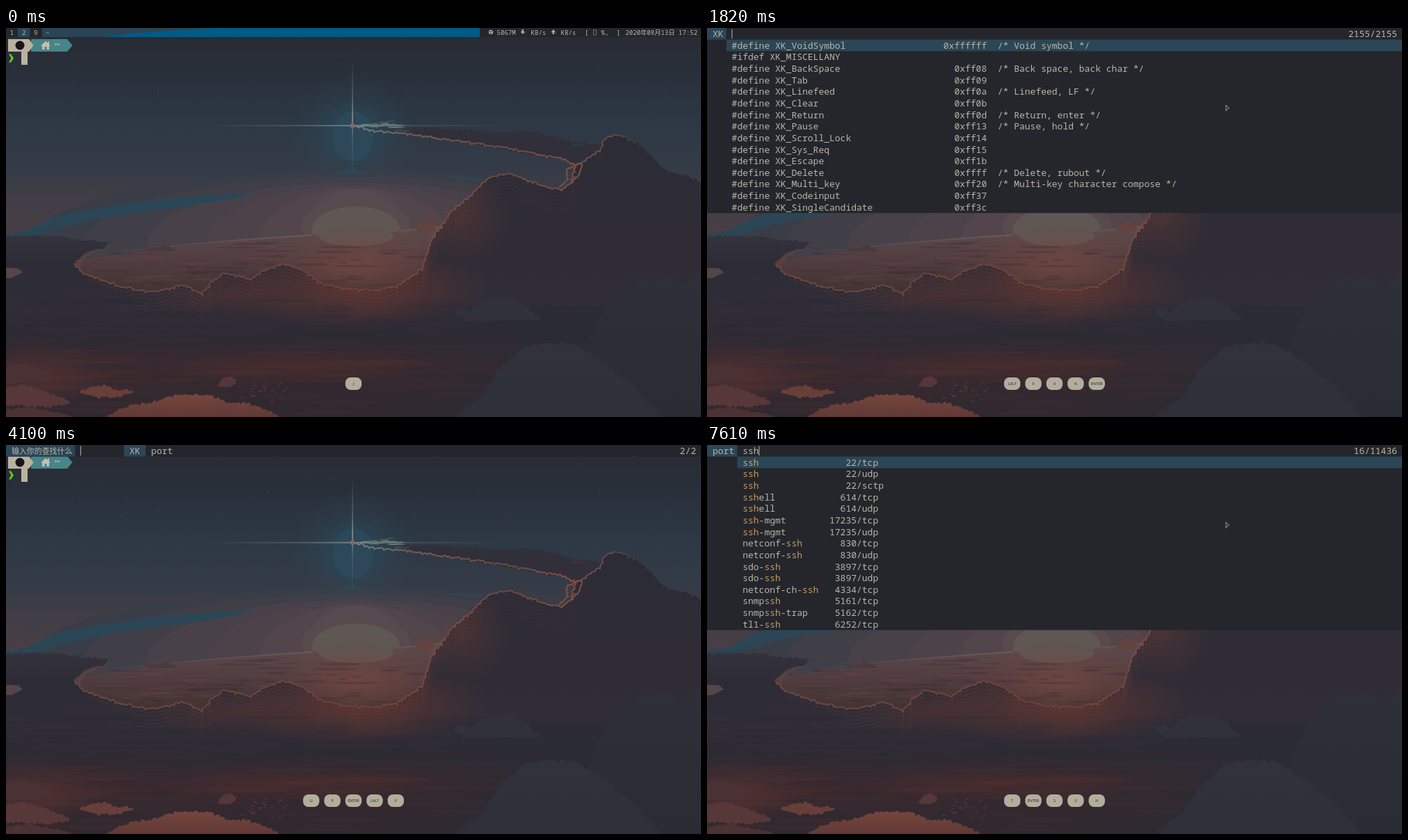
An HTML page with a canvas that plays this animation: 999 by 560 pixels, repeating every 8 s.

```html
<!DOCTYPE html>
<html lang="en">
<head>
<meta charset="utf-8">
<title>Menu lookup</title>
<style>
html, body { margin: 0; width: 999px; height: 560px; overflow: hidden; background: #2a2b34; }
canvas, svg { position: absolute; left: 0; top: 0; }
text { white-space: pre; fill: #bab6a8; font-family: "Noto Sans Mono", "Noto Sans CJK SC", "Noto Sans CJK JP", "Noto Sans CJK", monospace; font-size: 13px; }
#bar text { font-size: 9.1px; }
#keys text { font: 5.4px "Noto Sans", sans-serif; fill: #222; text-anchor: middle; }
#keys rect { fill: #b3ad9c; }
.hit { fill: #c79c5c; }
.sel .hit { fill: #c4ad56; }
.cjk { font-size: 10.93px; }
.end { text-anchor: end; }
</style>
</head>
<body>
<canvas id="sky" width="999" height="560"></canvas>
<svg width="999" height="560" xml:space="preserve">
  <g id="shell">
    <path d="M36 16H88L95.500 25L88 34H36Z" fill="#46858a"/>
    <path d="M3 16H33L39.500 25L33 34H3Z" fill="#bab29f"/>
    <circle cx="20" cy="25" r="6.500" fill="#15161a"/>
    <path d="M50 25.500L57 19L60 21.500V19.500H62V23.500L64 25.500H62V31H58.500V27H55.500V31H52V25.500Z" fill="#c6c0ae"/>
    <text x="69" y="29" style="font-size:15px;font-weight:700;fill:#c6c0ae">~</text>
    <path d="M4 37.500H7L11 43.500L7 49.500H4L7.500 43.500Z" fill="#5fd311"/>
    <rect x="22" y="34" width="9" height="19" fill="#bab29f"/>
  </g>
  <g id="bar">
    <rect width="999" height="13" fill="#24262c"/>
    <rect x="17" width="17.500" height="13" fill="#2b4656"/>
    <rect x="52" width="629" height="13" fill="#294555"/>
    <path d="M140 13L190 7L300 0H681V13Z" fill="#005b86"/>
    <text x="5.500" y="9.500">1</text><text x="23" y="9.500">2</text>
    <text x="40" y="9.500">9</text><text x="57" y="9.500">~</text>
    <circle cx="697" cy="6" r="3.200" fill="#aaa698"/>
    <path d="M695 4.500L697 6L699 4M695.500 8H698" stroke="#24262c" fill="none"/>
    <path d="M741.500 2H744V5H746L742.700 9L739.500 5H741.500Z" fill="#aaa698"/>
    <path d="M785.500 9H788V6H790L786.700 2L783.500 6H785.500Z" fill="#aaa698"/>
    <path d="M746 5V9M790 5V9" stroke="#595950"/>
    <text x="705.500" y="9.500">5067M</text><text x="754.500" y="9.500">KB/s</text>
    <text x="797.500" y="9.500">KB/s</text><text x="832" y="9.500">[</text>
    <rect x="844.500" y="3" width="4" height="7" fill="none" stroke="#aaa698" stroke-width=".6"/>
    <text x="855.500" y="9.500">%,</text><text x="877.500" y="9.500">]</text>
    <text x="994" y="9.500" class="end">2020年08月13日 17:52</text>
  </g>
  <g id="menu"></g>
  <path id="pointer" d="M746 111L750.500 115.500L748 116.500L746 119.500Z" fill="#222329" stroke="#aaa5ba" stroke-width=".9"/>
  <g id="keys"></g>
</svg>
<script>
const $ = id => document.getElementById(id);

// ---------- wallpaper ----------
const c = $('sky').getContext('2d');
let seed = 11;
const rnd = () => (seed = (seed * 16807) % 2147483647) / 2147483647;

function linear(x0, y0, x1, y1, stops) {
  const g = c.createLinearGradient(x0, y0, x1, y1);
  stops.forEach(([at, color]) => g.addColorStop(at, color));
  return g;
}
function oval(x, y, rx, ry, fill) {
  c.fillStyle = fill;
  c.beginPath();
  c.ellipse(x, y, rx, ry, 0, 0, 7);
  c.fill();
}
function glow(x, y, rx, ry, rgb, alpha) {
  c.save();
  c.translate(x, y);
  c.scale(rx, ry);
  const g = c.createRadialGradient(0, 0, 0, 0, 0, 1);
  g.addColorStop(0, `rgba(${rgb},${alpha})`);
  g.addColorStop(1, `rgba(${rgb},0)`);
  c.fillStyle = g;
  c.fillRect(-1, -1, 2, 2);
  c.restore();
}
// Bumpy cloud outline through a few points
function puff(points, step = 8, bump = .7) {
  const p = points.split(' ').map(s => s.split(',').map(Number));
  let d = 'M' + p[0];
  for (let i = 1; i < p.length; i++) {
    const [x0, y0] = p[i - 1], [x1, y1] = p[i];
    const dx = x1 - x0, dy = y1 - y0, len = Math.hypot(dx, dy);
    const n = Math.max(1, Math.round(len / step));
    for (let k = 1; k <= n; k++) {
      const m = (k - .5) / n, h = bump * step * (rnd() + .15) / len, j = k < n ? (rnd() - .5) * 3 : 0;
      d += `Q${x0 + dx * m + dy * h} ${y0 + dy * m - dx * h} ${x0 + dx * k / n} ${y0 + dy * k / n + j}`;
    }
  }
  return d;
}
function fill(d, style) { c.fillStyle = style; c.fill(new Path2D(d)); }
function stroke(d, style, width, dy = 0) {
  c.save();
  c.translate(0, dy);
  c.strokeStyle = style;
  c.lineWidth = width;
  c.stroke(new Path2D(d));
  c.restore();
}

function drawSky() {
  c.fillStyle = linear(0, 0, 0, 400, [[0, '#272a32'], [.2, '#2a313c'], [.36, '#2d3945'],
    [.5, '#343b46'], [.6, '#3f3d46'], [.78, '#4b3f44'], [1, '#3d3037']]);
  c.fillRect(0, 0, 999, 560);
  for (let i = 0; i < 45; i++) oval(rnd() * 999, 15 + rnd() * 110, .5, .5, 'rgba(150,160,165,.4)');

  // nested bands of dusk light
  [[470, 104, '#393d47'], [390, 96, '#403f48'], [300, 87, '#484149'], [215, 83, '#4d424a'], [140, 80, '#52454b']]
    .forEach(([rx, ry, color]) => oval(503, 310, rx, ry, color));
  fill('M18 299C55 276 80 267 112 264C190 250 240 243 362 237Q320 249 260 256C170 268 110 276 62 292Q35 301 0 302Z', '#2b4757');
  fill('M0 296Q50 291 90 270L60 295L0 304Z', '#2b4555');
  fill('M628 213Q665 214 692 219Q670 222 628 213Z', '#2c4656');
  fill('M468 209Q490 206 497 199Q505 207 526 209Z', '#2c4554');

  // bright star and its rays
  glow(499, 150, 90, 85, '42,80,96', .5);
  oval(499, 152, 47, 43, 'rgba(42,70,86,.35)');
  oval(499, 156, 30, 36, '#2c4859');
  const ray = (x0, y0, x1, y1) => linear(x0, y0, x1, y1,
    [[0, 'rgba(130,137,137,0)'], [.3, 'rgba(120,126,126,.55)'], [.5, '#94938e'], [.7, 'rgba(120,126,126,.35)'], [1, 'rgba(130,137,137,0)']]);
  c.fillStyle = ray(0, 48, 0, 212); c.fillRect(497.300, 48, 1.600, 164);
  c.fillStyle = ray(290, 0, 720, 0); c.fillRect(290, 139.800, 430, 1.500);

  // sun, horizon and low haze
  oval(503, 284, 69, 53, '#574950');
  oval(503, 285, 78, 36, '#594a4e');
  oval(503, 290, 63, 33, '#5f5753');
  fill('M95 335Q250 312 440 297L503 303L566 292L650 283V400H95Z',
    linear(0, 290, 0, 390, [[0, '#5d4a4b'], [.4, '#523e41'], [1, '#40302f']]));
  stroke('M110 329Q260 309 440 298', linear(100, 0, 440, 0, [[0, 'rgba(104,87,83,0)'], [1, '#6b5b57']]), 2);
  stroke('M566 292Q600 288 640 284', 'rgba(113,88,82,.7)', 2);
  oval(503, 299, 54, 15, '#5f5552');
  glow(505, 340, 130, 55, '118,72,64', .75);
  for (let i = 0; i < 90; i++) {
    const y = 308 + rnd() * 66, x = 150 + rnd() * 450;
    oval(x, y, 6 + rnd() * 28, .6 + rnd() * 1.500, rnd() < .5 ? 'rgba(112,77,71,.2)' : 'rgba(50,38,44,.25)');
  }
  fill(puff('203,322 215,316 228,314 245,321') + 'Z', '#493a40');
}

function drawTrail() {
  fill(puff('560,149 600,145 680,150 760,151 822,166 868,170 840,205 800,188 720,175 620,157') + 'Z', '#302f3a');
  const edge = puff('500,141 530,150 570,152 620,160 675,167 730,176 770,184 800,190 818,198', 7);
  stroke(edge, linear(500, 0, 820, 0, [[0, '#76817e'], [.25, '#735b52'], [.7, '#70493f'], [1, '#835044']]), 2);
  for (let i = 0; i < 26; i++) {
    const x = 505 + rnd() * 55, s = (x - 498) / 8;
    const y = 140 + (rnd() * 2 - 1) * s;
    stroke(`M${x} ${y}q8 ${rnd() * 4 - 2} ${8 + rnd() * 16} ${rnd() * 4 - 2}`, 'rgba(128,142,138,.65)', .8);
  }
  oval(498, 140.500, 3.500, 3.500, '#83685f');
}

function drawClouds() {
  // distant ridge on the left and the tower on the right share one outline
  const ridge = puff('95,338 112,355 135,363 165,373 200,381 235,377 255,371 282,384 298,365 315,354 352,363 378,347 402,342 428,350 448,367 482,376 530,379 562,374 580,361 598,349 606,325 612,305 627,288 640,265 664,247 682,228 697,215 724,210 750,222 778,230 799,234 815,222 819,200 840,186 854,178 862,160 880,155 910,168 930,188 950,208 980,214 1000,224');
  fill(ridge + 'V560H0V350Z', linear(0, 150, 0, 560, [[0, '#2b2c36'], [.45, '#302c35'],
    [.58, '#302d36'], [.7, '#2e2b34'], [.82, '#38292e'], [1, '#302930']]));
  c.save();
  c.clip(new Path2D(ridge + 'V560H0V350Z'));
  glow(510, 376, 190, 62, '105,54,48', .75);
  glow(655, 270, 70, 70, '96,56,52', .5);
  glow(330, 385, 130, 35, '86,50,49', .5);
  for (let i = 1; i < 7; i++)
    stroke(ridge, linear(80, 0, 900, 0, [[0, 'rgba(105,64,58,.2)'], [.6, `rgba(115,66,56,${.42 - i * .055})`],
      [.85, 'rgba(92,60,59,.12)'], [1, 'rgba(60,50,58,0)']]), 1.300, i * 5.500);
  c.restore();
  stroke(ridge, linear(95, 0, 960, 0, [[0, '#6e4942'], [.25, '#70463f'], [.5, '#6e423b'], [.62, '#824d42'],
    [.72, '#75483f'], [.84, '#805145'], [.9, '#6d4b46'], [.95, 'rgba(70,54,58,.4)'], [1, 'rgba(60,50,58,0)']]), 1.800);
  stroke(puff('796,230 808,218 806,205 818,198 828,196 822,212 812,222', 5), '#80513f', 1.800);
  fill(puff('590,292 594,283 606,278 617,284 613,292 600,296', 5) + 'Z', '#63433f');
  for (let i = 0; i < 9; i++) oval(614 + rnd() * 24, 264 + rnd() * 22, 1.500, 1, '#69463f');
  for (let i = 0; i < 7; i++) oval(814 + i * 2.500, 169 + rnd() * 5 - 3, 1.500, .8, '#4c4143');

  // left anvil cloud
  fill(puff('0,302 30,300 75,301 108,307 147,309') + 'L140 318L112 325L96 341L120 366L175 385L190 400H0Z',
    linear(0, 300, 0, 400, [[0, '#33323d'], [.4, '#2d2c36'], [1, '#302d37']]));
  fill('M0 345L18 346L24 352L8 360H0Z', '#554448');
  fill(puff('0,373 10,363 30,355 50,362 80,368') + 'V390H0Z', '#2e2d37');
  for (let i = 0; i < 5; i++)
    stroke(puff(`${142 - i * 6},${316 + i * 2} ${116 - i * 3},${323 + i * 4} ${98 + i * 2},${338 + i * 3}`, 6), `rgba(116,72,63,${.55 - i * .07})`, 1.300);
}

function drawFront() {
  // streaky cloud floor
  for (let i = 0; i < 150; i++) {
    const y = 392 + rnd() * 165, x = rnd() * 780;
    const warm = y > 455 && rnd() < .55;
    oval(x, y, 20 + rnd() * 75, 1 + rnd() * 4, warm ? 'rgba(92,48,46,.13)' : 'rgba(40,40,50,.2)');
  }
  glow(420, 488, 230, 24, '92,48,46', .4);
  glow(40, 500, 100, 45, '104,55,51', .5);
  c.fillStyle = linear(540, 0, 999, 0, [[0, 'rgba(42,43,52,0)'], [.5, 'rgba(42,43,52,.75)'], [1, 'rgba(41,43,50,.85)']]);
  c.fillRect(540, 400, 459, 160);

  fill(puff('655,422 668,408 690,393 720,389 745,400 768,420', 12) + 'Z', '#30313b');
  fill(puff('830,560 845,440 865,400 890,378 915,362 950,360 975,372 1000,355', 14) + 'V560Z',
    linear(0, 350, 0, 560, [[0, '#2e3039'], [1, '#2a2c34']]));
  fill(puff('650,560 690,525 712,492 742,462 780,455 820,458 855,480 905,520 940,560', 14) + 'Z',
    linear(0, 450, 0, 560, [[0, '#30333c'], [1, '#2d3038']]));
  fill(puff('645,412 648,404 658,402 664,410 655,417', 5) + 'Z', '#32323c');

  // red-lit tops along the bottom
  fill(puff('0,488 20,483 45,489 62,498 40,508 0,510') + 'Z', '#4a3134');
  fill(puff('0,519 22,514 48,522 72,530 92,540 60,545 0,542') + 'Z', '#573737');
  fill(puff('106,525 122,517 145,516 162,522 184,523 160,530 130,531') + 'Z', '#683e39');
  fill(puff('305,516 310,506 322,502 331,509 320,517', 6) + 'Z', '#55363a');
  const bank = puff('145,560 160,551 183,543 210,540 232,531 262,529 292,529 316,540 345,541 368,549 392,560');
  fill(bank + 'Z', linear(0, 528, 0, 560, [[0, '#75453e'], [1, '#603936']]));
  fill(puff('0,552 30,546 70,554 95,560') + 'H0Z', '#4c3234');
  for (let i = 0; i < 24; i++) oval(330 + rnd() * 75, 508 + rnd() * 30, 1 + rnd() * 2.500, 1, 'rgba(98,56,52,.7)');
}

drawSky();
drawTrail();
drawClouds();
drawFront();

// ---------- menus ----------
const ROW = 16.65, COL = 7.8, LOOP = 8000, BG = '#24262c', PICK = '#2b4656';

const symbols = `VoidSymbol ffffff Void symbol
!#ifdef XK_MISCELLANY
BackSpace ff08 Back space, back char
Tab ff09
Linefeed ff0a Linefeed, LF
Clear ff0b
Return ff0d Return, enter
Pause ff13 Pause, hold
Scroll_Lock ff14
Sys_Req ff15
Escape ff1b
Delete ffff Delete, rubout
Multi_key ff20 Multi-key character compose
Codeinput ff37
SingleCandidate ff3c
Up ff52 Move up, up arrow
Page_Up ff55
KP_Up ff97
KP_Page_Up ff9a
Super_L ffeb Left super
Super_R ffec Right super
ISO_Group_Shift ff7e Alias for mode_switch
ISO_Group_Latch fe06
ISO_Group_Lock fe07
ISO_Next_Group fe08
ISO_Next_Group_Lock fe09
ISO_Prev_Group fe0a
ISO_Prev_Group_Lock fe0b
ISO_First_Group fe0c
ISO_First_Group_Lock fe0d`.split('\n').map(line => {
  if (line[0] === '!') return line.slice(1);
  const [name, code, ...note] = line.split(' ');
  return ('#define XK_' + name).padEnd(45 - code.length) + '0x' + code + (note.length ? `  /* ${note.join(' ')} */` : '');
});

const services = `tcpmux 1 tcp udp
compressnet 2 tcp udp
compressnet 3 tcp udp
rje 5 tcp udp
echo 7 tcp udp
discard 9 tcp udp sctp dccp
systat 11 tcp udp
ssh 22 tcp udp sctp
sshell 614 tcp udp
ssh-mgmt 17235 tcp udp
netconf-ssh 830 tcp udp
sdo-ssh 3897 tcp udp
netconf-ch-ssh 4334 tcp
snmpssh 5161 tcp
snmpssh-trap 5162 tcp
tl1-ssh 6252 tcp`.split('\n').flatMap(line => {
  const [name, port, ...kinds] = line.split(' ');
  return kinds.map(kind => name.padEnd(21 - port.length) + port + '/' + kind);
});

const lists = {
  XK: { lines: symbols, total: 2155, found: { u: 343, up: 64 } },
  port: { lines: services, total: 11436, found: { s: 5127, ss: 489, ssh: 16 } }
};

const text = (x, row, str, cls = '') => `<text x="${x}" y="${ROW * (row + .5) + 4.7}" class="${cls}">${str}</text>`;
const box = (x, y, w, h, color) => `<rect x="${x}" y="${y}" width="${w}" height="${h}" fill="${color}"/>`;
const mark = (str, query) => query ? str.replace(new RegExp(query, 'gi'), '<tspan class="hit">$&</tspan>') : str;
const matches = (list, query) => list.filter(s => s.toLowerCase().includes(query));

// Prompt, typed query with caret, and counter
function head(prompt, width, query, count, height, cls) {
  const x = width + COL;
  return box(0, 0, 999, height, BG) + box(0, 0, width, ROW, PICK) + text(8, 0, prompt, cls) +
    text(x, 0, query) + box(x + COL * query.length - .2, 1.5, 1, 13.8, '#bab6a8') + text(992, 0, count, 'end');
}
function strip(query) {
  const items = matches(['XK', 'port'], query);
  let x = 169.6, out = head('输入你的查找什么', 99.2, query, items.length + '/2', ROW, 'cjk');
  items.forEach((item, i) => {
    const w = COL * (item.length + 2);
    if (!i) out += box(x, 0, w, ROW, PICK);
    out += text(x + COL, 0, mark(item, query), i ? '' : 'sel');
    x += w;
  });
  return out;
}
function sheet(name, query) {
  const { lines, total, found } = lists[name], w = COL * name.length + 12.2;
  const rows = matches(lines, query).slice(0, 15);
  return head(name, w, query, (found[query] || total) + '/' + total, ROW * 16, '') +
    box(w, ROW, 999 - w, ROW, PICK) +
    rows.map((s, i) => text(w + COL, i + 1, mark(s, query), i ? '' : 'sel')).join('');
}

// ---------- timeline ----------
const presses = [[0, 'J'], [210, 'LALT'], [420, 'F'], [1250, 'X'], [1370, 'K'], [1660, 'ENTER'], [2300, 'U'], [2360, 'P'],
  [3380, 'ENTER'], [3740, 'LALT'], [3920, 'F'], [5070, 'P'], [5190, 'O'], [5310, 'R'], [5630, 'T'], [6140, 'ENTER'],
  [7310, 'S'], [7410, 'S'], [7510, 'H']];
const views = [[0, 'bar', ''], [480, 'strip', ''], [1310, 'strip', 'x'], [1430, 'strip', 'xk'], [1720, 'XK', ''],
  [2360, 'XK', 'u'], [2420, 'XK', 'up'], [3430, 'bar', ''], [3980, 'strip', ''], [5130, 'strip', 'p'],
  [5250, 'strip', 'po'], [5380, 'strip', 'por'], [5680, 'strip', 'port'], [6140, 'bar', ''], [6195, 'port', ''],
  [7360, 'port', 's'], [7460, 'port', 'ss'], [7560, 'port', 'ssh']];

const upTo = (list, t) => list.filter(([at]) => at <= t);
let shownKeys = 0, shownView = 0;

function drawKeys(labels) {
  $('keys').innerHTML = labels.map((label, i) => {
    const x = 499.5 + (i - (labels.length - 1) / 2) * 30.4;
    return `<rect x="${x - 11.7}" y="503" width="23.4" height="18" rx="7.5"/><text x="${x}" y="513.9">${label}</text>`;
  }).join('');
}
function tick(now) {
  const t = now % LOOP, pressed = upTo(presses, t), passed = upTo(views, t);
  const [, view, query] = passed[passed.length - 1];
  if (pressed.length !== shownKeys) {
    shownKeys = pressed.length;
    drawKeys(pressed.slice(-5).map(p => p[1]));
  }
  if (passed.length !== shownView) {
    shownView = passed.length;
    $('menu').innerHTML = view === 'bar' ? '' : view === 'strip' ? strip(query) : sheet(view, query);
  }
  const pointing = view === 'port' || view === 'XK' && t < 3330;
  $('pointer').style.display = pointing ? '' : 'none';
  requestAnimationFrame(tick);
}
tick(0);
</script>
</body>
</html>
```
